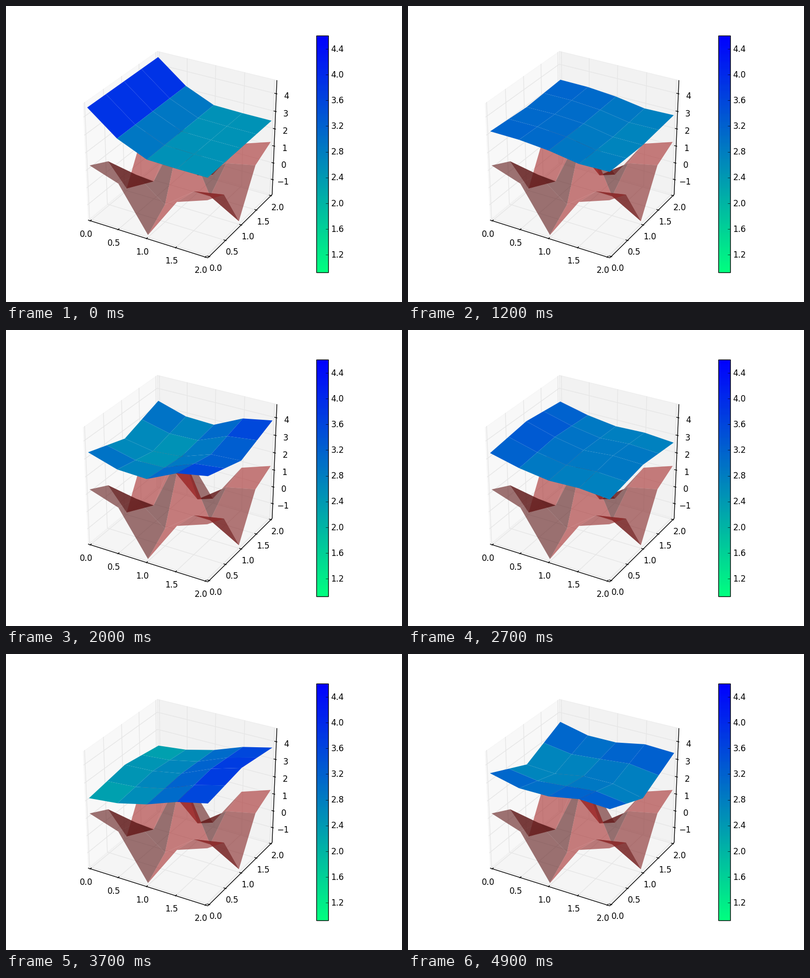
Write a matplotlib script that moves like this. It is 800 by 600 pixels and loops after 5000 ms.

```python
import numpy as np
import matplotlib.pyplot as plt
from matplotlib.animation import FuncAnimation
from matplotlib.collections import LineCollection, PolyCollection

FRAMES, INTERVAL = 50, 100
Z_MIN, Z_MAX = -1.77, 4.62
C_MIN, C_MAX = 0.924, 4.607
DIST = 10
PAD = 0.5 + 1 / 48          # panes sit slightly outside the data cube
S3 = np.sqrt(3) / 2
RIGHT = np.array([S3, 0.5, 0])
UP = np.array([-0.25, S3 / 2, S3])
TOWARD = np.array([S3 / 2, -0.75, 0.5])
SCALE = np.array([496, 480]) / 0.185

plt.rcParams.update({"font.family": "DejaVu Sans", "font.size": 12})
fig = plt.figure(figsize=(8, 6), dpi=100, facecolor="white")
ax = fig.add_axes([0, 0, 1, 1])


def project(d):
    """Centred unit-cube points to screen x, y and distance from the eye."""
    d = np.asarray(d, float)
    w = DIST - d @ TOWARD
    sx = 100 + (d @ RIGHT / w + 0.095) * SCALE[0]
    sy = 540 - (d @ UP / w + 0.095) * SCALE[1]
    return np.stack([sx, sy, w], axis=-1)


def unit_z(z):
    return (z - Z_MIN) / (Z_MAX - Z_MIN) - 0.5


def unit_xy(v):
    return v / 2 - 0.5


grid = np.linspace(0, 2, 5)
X, Y = np.meshgrid(grid, grid, indexing="ij")


def quads(a):
    """The four corners of each grid cell."""
    corners = np.stack([a[:-1, :-1], a[1:, :-1], a[1:, 1:], a[:-1, 1:]], axis=2)
    return corners.reshape(16, 4, *a.shape[2:])


def surface(z):
    """Screen polygons and their back-to-front order."""
    p = quads(project(np.stack([unit_xy(X), unit_xy(Y), unit_z(z)], axis=-1)))
    order = np.argsort(-p[:, :, 2].mean(axis=1))
    return p[order, :, :2], order


def water(t):
    """Standing waves; the second one slowly turns from x towards y."""
    def swing(period):
        return np.cos(2 * np.pi * t / period)

    def wave(k, v):
        return np.cos(k * np.pi * v / 2)

    turn = np.pi * t / 10
    z = 2.943 + 0.76 * wave(1, X) * swing(1.5)
    z += 0.48 * wave(2, X) * swing(0.95) * np.cos(turn)
    z += 0.45 * wave(2, Y) * (1 + 0.4 * wave(2, X)) * swing(1) * np.sin(turn)
    z += 0.24 * wave(3, X) * swing(0.7) * np.exp(-t / 10)
    return z + 0.075 * wave(4, X) * swing(0.6) * np.exp(-t)


# --- box, ticks and labels ---------------------------------------------
def to_screen(points):
    return project(points)[:, :2]


def lines(paths, color, z):
    ax.add_collection(LineCollection([to_screen(p) for p in paths], colors=color,
                                     linewidths=1, zorder=z))


def label(x, y, text, ha="center"):
    ax.text(x, y + 5.8, text, ha=ha, va="baseline", color="black", zorder=6)


L, H = -PAD, PAD
panes = [
    ([(L, L, L), (L, H, L), (L, H, H), (L, L, H)], 0.95),
    ([(L, H, L), (H, H, L), (H, H, H), (L, H, H)], 0.90),
    ([(L, L, L), (H, L, L), (H, H, L), (L, H, L)], 0.925),
]
for corners, shade in panes:
    tint = [(shade,) * 3 + (0.5,)]
    ax.add_collection(PolyCollection([to_screen(corners)], zorder=1, linewidths=1,
                                     facecolors=tint, edgecolors=tint))

flat = unit_xy(grid)
levels = np.arange(-1, 5)
tall = unit_z(levels)
lines([[(v, L, L), (v, H, L), (v, H, H)] for v in flat]
      + [[(H, v, L), (L, v, L), (L, v, H)] for v in flat]
      + [[(H, H, v), (L, H, v), (L, L, v)] for v in tall], "0.9", 2)
lines([[(L, L, L), (H, L, L)], [(H, L, L), (H, H, L)], [(H, H, L), (H, H, H)]],
      "black", 3)

OUT, IN = 0.1 / 12, 0.2 / 12
lines([[(v, L - OUT, L), (v, L + IN, L)] for v in flat]
      + [[(H + OUT, v, L), (H - IN, v, L)] for v in flat]
      + [[(H + OUT, H, v), (H - IN, H, v)] for v in tall], "black", 3)

for value, v in zip(grid, flat):
    for point, (ox, oy) in (((v, L, L), (-8.5, 26.6)), ((H, v, L), (13.2, 23.4))):
        sx, sy = to_screen([point])[0]
        label(sx + ox, sy + oy, f"{value:.1f}")
for value, v in zip(levels, tall):
    sx, sy = to_screen([(H, H, v)])[0]
    label(sx + 20.5, sy + 4, str(value).replace("-", "\u2212"))

# --- colour bar --------------------------------------------------------
cmap = plt.get_cmap("winter_r")
ax.imshow(np.linspace(0, 1, 256)[:, None], cmap=cmap, origin="lower",
          extent=(627, 651, 540, 60), aspect="auto", interpolation="nearest",
          zorder=2)
ax.add_patch(plt.Rectangle((627, 60), 24, 480, fill=False, ec="black", lw=1,
                           zorder=4))
for value in np.arange(1.2, 4.5, 0.4):
    sy = 540 - (value - C_MIN) / (C_MAX - C_MIN) * 480
    ax.plot([645.5, 651], [sy, sy], color="black", lw=0.5, zorder=4)
    label(656.6, sy, f"{value:.1f}", ha="left")

# --- bed: uneven ground, one row of heights per x ----------------------
bed = np.array([[1.27, 0.69, -1.77, 0.66, 0.6],
                [0.71, 0.38, -0.85, 0.71, 0.68],
                [-1.77, -0.88, 2.78, -0.84, -1.63],
                [0.66, 0.4, -0.75, 0.36, 0.71],
                [1.26, 0.71, -1.72, 0.71, 1.27]])
bed[0, 3] = 0.72
cells = quads(np.stack([X, Y, bed], axis=-1))
normal = np.cross(cells[:, 1] - cells[:, 0], cells[:, 3] - cells[:, 0])
light = normal @ [-1, -1, 0.5] / np.linalg.norm(normal, axis=1)
light = 0.5 + 0.5 * (light - light.min()) / np.ptp(light)
brown = np.array([165, 42, 42]) / 255
bed_colors = np.column_stack([light[:, None] * brown, np.full(16, 0.6)])
bed_polys, bed_order = surface(bed)
ax.add_collection(PolyCollection(bed_polys, facecolors=bed_colors[bed_order],
                                 edgecolors="none", linewidths=0, zorder=4))

sheet = PolyCollection([], edgecolors="none", linewidths=0, zorder=5)
ax.add_collection(sheet)
ax.set_xlim(0, 800)
ax.set_ylim(600, 0)
ax.axis("off")


def draw(frame):
    z = water(frame * INTERVAL / 1000)
    polys, order = surface(z)
    mean = quads(z).mean(axis=1)[order]
    sheet.set_verts(polys)
    sheet.set_facecolor(cmap((mean - C_MIN) / (C_MAX - C_MIN)))
    return [sheet]


anim = FuncAnimation(fig, draw, frames=FRAMES, interval=INTERVAL, repeat=True,
                     repeat_delay=0)
plt.show()
```
